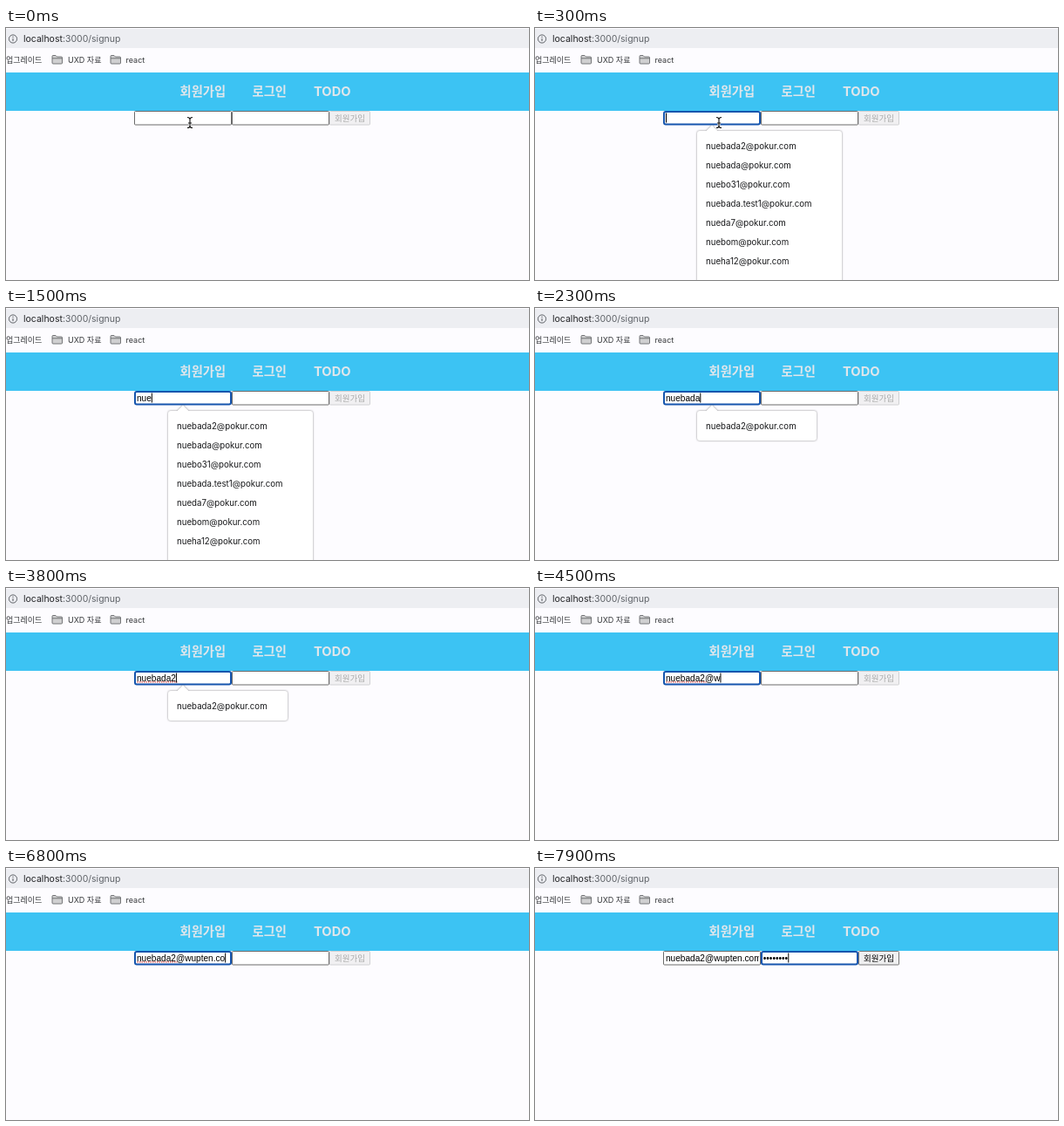
An HTML page that plays this animation: 600x289 px, repeating every 8000 ms.

```html
<!DOCTYPE html>
<html lang="ko">
<head>
<meta charset="utf-8">
<style>
  html, body { margin: 0; width: 100%; height: 100%; overflow: hidden; background: #fdfcff; }
  svg { display: block; width: 600px; height: 289px; }
  text { font-family: Inter, "Noto Sans CJK KR", "Noto Sans CJK", sans-serif; white-space: pre; }
  .url { font-size: 10.5px; fill: #5f6368; }
  .mark { font-size: 9px; fill: #35373a; }
  .nav { font-size: 14.3px; font-weight: 700; fill: #e0e6eb; }
  .typed { font: 10.1px "Liberation Sans", Arial, sans-serif; }
  .field { fill: #fff; stroke: #6b6b6b; }
  .field.focus { stroke: #1655ad; stroke-width: 2; }
  #send rect { fill: #f1f0f2; stroke: #d0d0d2; }
  #send text { font-size: 9.5px; fill: #aaa; }
  #send.ready rect { fill: #efeff0; stroke: #767676; }
  #send.ready text { fill: #000; }
  .panel { fill: #fff; filter: drop-shadow(0 .5px 1.2px #0007); }
  .hint { font-size: 9.7px; fill: #17181a; }
</style>
</head>
<body>
<svg viewBox="0 0 600 289">
  <defs>
    <clipPath id="inside"><rect x="149" y="96" width="108" height="15"/></clipPath>
    <g id="folder" stroke="#68696b" stroke-width=".9">
      <path d="M.5 9V1.5q0-1 1-1h3l1.500 1.500h5q1 0 1 1V9q0 1-1 1h-9.500q-1 0-1-1z" fill="#d0d0d1"/>
      <path d="M.5 3.800h11.500" fill="none"/>
    </g>
  </defs>

  <rect width="600" height="289" fill="#fdfcff"/>
  <rect y="1" width="600" height="22" fill="#edeef2"/>
  <circle cx="8" cy="12.500" r="4.600" fill="none" stroke="#5f6368"/>
  <path d="M8 9.800v1.200M8 12v3" stroke="#5f6368" stroke-width="1.100"/>
  <text class="url" x="20" y="16"><tspan fill="#202124">localhost</tspan>:3000/signup</text>

  <text class="mark" x="0" y="39.500">업그레이드</text>
  <use href="#folder" x="52.500" y="31"/>
  <text class="mark" x="71" y="39.500">UXD 자료</text>
  <use href="#folder" x="119.500" y="31"/>
  <text class="mark" x="137.500" y="39.500">react</text>

  <rect y="51" width="600" height="44" fill="#3cc3f3"/>
  <text class="nav" x="199.500" y="78">회원가입</text>
  <text class="nav" x="282.500" y="78">로그인</text>
  <text class="nav" x="353" y="78" style="font-size:14.700px">TODO</text>

  <rect id="passBox" class="field" x="259.500" y="95.500" width="111" height="15.500" rx="1"/>
  <rect id="mailBox" class="field" x="147.500" y="95.500" width="111" height="15.500" rx="1"/>
  <g id="send">
    <rect x="371.500" y="95.500" width="46" height="15.500" rx="1"/>
    <text x="377" y="106.500">회원가입</text>
  </g>
  <g clip-path="url(#inside)">
    <text id="mail" class="typed" y="106.500"></text>
    <path id="squiggle" stroke="#e2403c" stroke-width="1.300" stroke-dasharray="1.400 1.100"/>
  </g>
  <text id="pass" class="typed" x="261.800" y="106.500"></text>
  <rect id="caret" y="97.500" width="1" height="11"/>

  <g id="popup">
    <path id="panel" class="panel"/>
    <g id="hints"></g>
  </g>
  <g id="pointer" fill="none">
    <path id="beam" d="M208 102.500q3 0 3 2.200v7.500q0 2.300-3 2.300M214 102.500q-3 0-3 2.200v7.500q0 2.300 3 2.300M209 109h4" stroke="#fff" stroke-width="2.600"/>
    <use href="#beam" style="display:none"/>
    <path d="M208 102.500q3 0 3 2.200v7.500q0 2.300-3 2.300M214 102.500q-3 0-3 2.200v7.500q0 2.300 3 2.300M209 109h4" stroke="#111" stroke-width="1.100"/>
  </g>
</svg>
<script>
  const LOOP = 8000, MAIL_X = 150, TAB = 7000;
  const address = 'nuebada2@wupten.com';
  const mailKeys = [1100, 1300, 1500, 1800, 2000, 2100, 2300, 2500, 4000, 4400,
                    5500, 5700, 5800, 6000, 6200, 6300, 6700, 6800, 6900];
  const passKeys = [7100, 7200, 7300, 7400, 7500, 7700, 7800, 7900];
  // Every one of these moments makes the caret solid again.
  const caretStarts = [100, 1000, ...mailKeys, TAB, ...passKeys];
  const suggestions = ['nuebada2@pokur.com', 'nuebada@pokur.com', 'nuebo31@pokur.com',
                       'nuebada.test1@pokur.com', 'nueda7@pokur.com', 'nuebom@pokur.com', 'nueha12@pokur.com'];

  const $ = id => document.getElementById(id);
  const show = (id, on) => $(id).style.display = on ? '' : 'none';
  const count = (times, t) => times.filter(k => k <= t).length;

  $('hints').innerHTML = suggestions.map((s, i) =>
    `<text class="hint" x="196" y="${138.5 + 22 * i}">${s}</text>`).join('');

  function focusBox(id, x, on) {
    const box = $(id), inset = on ? 1 : .5;
    box.classList.toggle('focus', on);
    box.setAttribute('x', x + inset);
    box.setAttribute('y', 95 + inset);
    box.setAttribute('width', 112 - 2 * inset);
    box.setAttribute('height', 16.5 - 2 * inset);
    box.setAttribute('rx', on ? 2 : 1);
  }

  function drawPopup(t) {
    const full = t >= 200 && t < 600 || t >= 1100 && t < 2000;
    const single = t >= 2000 && t < 4400;
    show('popup', full || single);
    const right = full ? 352 : 323, bottom = full ? 294 : 152;
    $('panel').setAttribute('d', `M189 118H196.500L203 111.500L209.500 118H${right - 3}q3 0 3 3V${bottom - 3}` +
      `q0 3-3 3H189q-3 0-3-3V121q0-3 3-3z`);
    [...$('hints').children].forEach((row, i) => row.style.display = full || i === 0 ? '' : 'none');
  }

  function draw(t) {
    const mail = $('mail'), pass = $('pass');
    const inMail = t >= 100 && t < TAB, inPass = t >= TAB;
    focusBox('mailBox', 147, inMail);
    focusBox('passBox', 259, inPass);

    mail.textContent = address.slice(0, count(mailKeys, t));
    pass.textContent = '•'.repeat(count(passKeys, t));
    const width = mail.getComputedTextLength();
    const x = inMail ? Math.min(MAIL_X, 256 - width) : MAIL_X;
    mail.setAttribute('x', x);

    show('squiggle', t >= 3000 && inMail);
    $('squiggle').setAttribute('d', `M${x + .5} 107.800h46`);

    const last = caretStarts[count(caretStarts, t) - 1];
    show('caret', (inMail || inPass) && (t - last) % 1000 < 500);
    $('caret').setAttribute('x', inPass ? 262 + pass.getComputedTextLength() : x + width);

    $('send').classList.toggle('ready', pass.textContent.length === passKeys.length);
    show('pointer', t < 600);
    drawPopup(t);
  }

  function tick() {
    draw(performance.now() % LOOP);
    requestAnimationFrame(tick);
  }
  tick();
</script>
</body>
</html>
```
